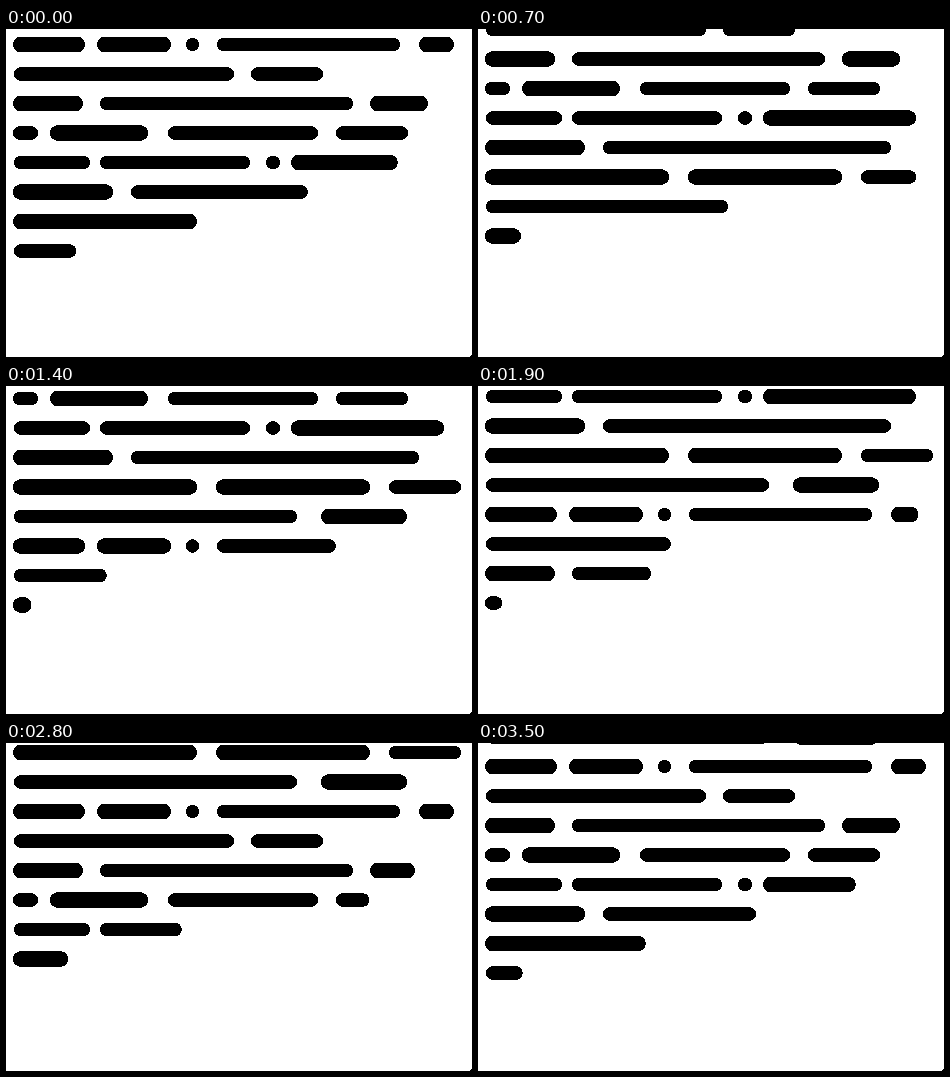
These frames come from a looping animation (466x329 px, 3.6 s). An HTML page with a canvas:

```html
<!DOCTYPE html>
<html lang="en">
<head>
<meta charset="utf-8">
<title>Typing lines</title>
<style>
html, body { margin: 0; width: 466px; height: 329px; overflow: hidden; background: #fff; }
canvas { display: block; }
</style>
</head>
<body>
<canvas id="stage" width="466" height="329"></canvas>
<script>
const ctx = document.getElementById("stage").getContext("2d");
const STEP = 100, LOOP = 36, GAP = 29.5, TOP = 252.5;
const THIN = 13.5, BOLD = 15.5;

// Each word: left, right, thickness, first step, last step of its growth
const rows = [
  [[7, 79, BOLD, 5.3, 10], [91, 165, BOLD, 7.5, 11], [180, 193, THIN, 10, 10.5],
   [211, 394, THIN, 10.4, 16.2], [413, 448, BOLD, 16.5, 20.6]],
  [[8, 228, THIN, 9.7, 20.9], [245, 317, THIN, 20.6, 25.4]],
  [[7, 77, BOLD, 13.8, 17.5], [94, 347, THIN, 17.3, 23.5], [364, 422, BOLD, 22.3, 30.5]],
  [[7, 32, THIN, 18, 21], [44, 142, BOLD, 20.6, 24.4], [162, 312, THIN, 23.5, 27],
   [330, 402, THIN, 26.4, 31.1]],
  [[8, 84, THIN, 22, 26], [94, 244, THIN, 25.5, 30.5], [260, 274, THIN, 29.3, 29.8],
   [285, 438, BOLD, 29.5, 39.3]],
  [[7, 107, BOLD, 25, 31.4], [125, 413, THIN, 29.1, 40.7]],
  [[7, 191, BOLD, 30, 35.8], [210, 364, BOLD, 36.3, 41], [383, 455, THIN, 40.5, 44]],
  [[8, 291, THIN, 34.1, 44.6], [315, 401, BOLD, 43.8, 49]]
];

// Scroll distance at given steps
const path = [[0, 0], [7, 44.5], [14, 91.5], [19, 123], [23, 149.5],
  [28, 183], [35, 228], [36, 236]];

function scrollAt(step) {
  const turns = Math.floor(step / LOOP), s = step - turns * LOOP;
  const i = path.findIndex(p => p[0] > s);
  const [s0, d0] = path[i - 1], [s1, d1] = path[i];
  return turns * GAP * rows.length + d0 + (d1 - d0) * (s - s0) / (s1 - s0);
}

// Crisp pill, one pixel row at a time
function pill(x, cy, w, h) {
  const r = h / 2;
  for (let y = Math.floor(cy - r); y <= cy + r; y++) {
    const d = y + 0.5 - cy;
    if (Math.abs(d) >= r) continue;
    const inset = r - Math.sqrt(r * r - d * d);
    const a = Math.round(x + inset), b = Math.round(x + w - inset);
    ctx.fillRect(a, y, b - a, 1);
  }
}

function drawRows(step) {
  const scroll = scrollAt(step);
  rows.forEach((words, k) => {
    const cy = TOP + GAP * k - scroll;
    if (cy < -10) return;
    for (const [x0, x1, h, start, end] of words) {
      if (step < start) continue;
      const grown = Math.min(1, (step - start) / (end - start));
      pill(x0, cy, h + (x1 - x0 - h) * grown, h);
    }
  });
}

function draw(now) {
  const step = Math.floor(now / STEP) % LOOP;
  ctx.fillStyle = "#fff";
  ctx.fillRect(0, 0, 466, 329);
  ctx.fillStyle = "#000";
  drawRows(step);
  drawRows(step + LOOP);
  ctx.fillRect(0, 0, 466, 1);
  ctx.fillRect(465, 327, 1, 2);
  ctx.fillRect(464, 328, 1, 1);
}

let began;
function tick(now) {
  began ??= now;
  draw(now - began);
  requestAnimationFrame(tick);
}
draw(0);
requestAnimationFrame(tick);
</script>
</body>
</html>
```
